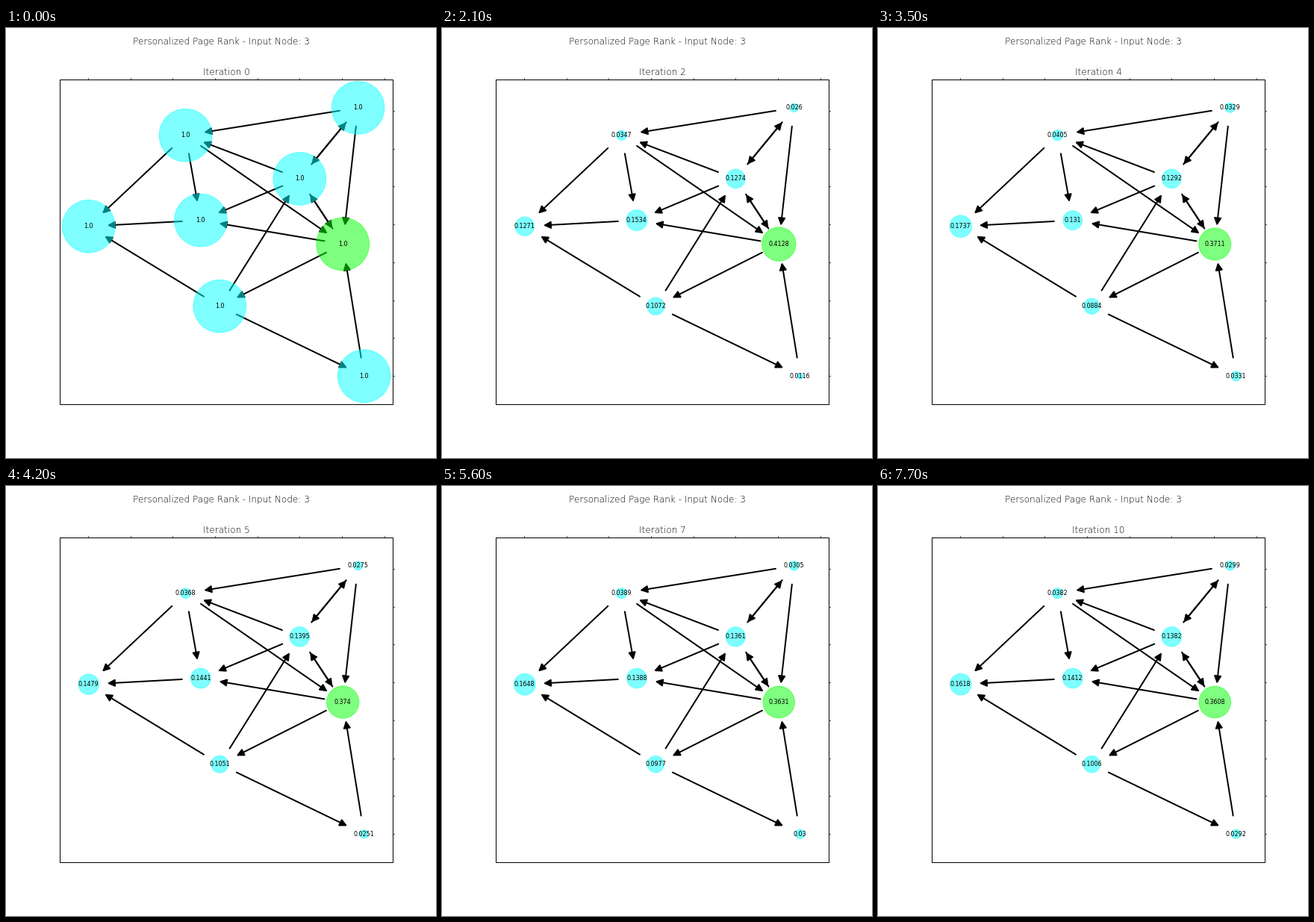
A matplotlib script for the animation above (8000 ms loop, 576 by 576 pixels).

```python
import numpy as np
import matplotlib.pyplot as plt
from matplotlib.animation import FuncAnimation
from matplotlib.patches import FancyArrowPatch

plt.rcParams["font.family"] = "DejaVu Sans"

SIZE, DPI = 576, 72
INTERVAL, FRAMES = 100, 80
DAMPING = 0.85
INPUT = "D"
LEFT, TOP, RIGHT, BOTTOM = 72, 69.12, 518.4, 504

# Node centres in pixels, y downwards
NODES = {
    "A": (240.5, 143.7), "B": (471.6, 106.86), "C": (393.3, 201.9),
    "D": (451.2, 289.5), "E": (260.8, 257.6), "F": (110.74, 265.7),
    "G": (286.3, 372.7), "H": (479.66, 466.26),
}
LINKS = {
    "A": "DEF", "B": "ACD", "C": "ABDE", "D": "CEG",
    "E": "F", "F": "", "G": "CFH", "H": "D",
}
NAMES = list(NODES)


def page_ranks(steps):
    """Rank vectors per iteration; a dead end jumps back to the input node."""
    ranks = [np.ones(len(NAMES))]
    for _ in range(steps):
        new = np.zeros(len(NAMES))
        for name, rank in zip(NAMES, ranks[-1]):
            targets = LINKS[name] or INPUT
            for target in targets:
                new[NAMES.index(target)] += DAMPING * rank / len(targets)
        new[NAMES.index(INPUT)] += 1 - DAMPING
        ranks.append(new / new.sum())
    return ranks


RANKS = page_ranks(10)

fig = plt.figure(figsize=(SIZE / DPI, SIZE / DPI), dpi=DPI, facecolor="white")
ax = fig.add_axes([0, 0, 1, 1])
ax.set_xlim(0, SIZE)
ax.set_ylim(SIZE, 0)
ax.axis("off")


def line(xs, ys, color="black"):
    ax.plot(xs, ys, color=color, lw=1, zorder=3, solid_capstyle="projecting")


def draw_frame():
    line([LEFT, RIGHT, RIGHT, LEFT, LEFT], [TOP, TOP, BOTTOM, BOTTOM, TOP])
    for x in np.linspace(110, 506.6, 8):
        line([x, x], [TOP - 2, TOP - 1], "#555555")
    for y in np.linspace(111, 466, 8):
        line([RIGHT + 1, RIGHT + 2], [y, y], "#555555")


def draw_links():
    for source, targets in LINKS.items():
        for target in targets:
            ax.add_patch(FancyArrowPatch(
                NODES[source], NODES[target], arrowstyle="-|>",
                mutation_scale=20, shrinkA=25, shrinkB=25, lw=2,
                color="black", zorder=1))


draw_frame()
draw_links()
colors = ["lime" if name == INPUT else "cyan" for name in NAMES]
dots = ax.scatter(*zip(*NODES.values()), s=5000, c=colors, alpha=0.5,
                  linewidths=1, edgecolors=colors, zorder=2)
labels = [ax.text(x, y, "", size=8, ha="center", va="center", zorder=4)
          for x, y in NODES.values()]
heading = dict(size=12, weight="ultralight", ha="center")
title = ax.text((LEFT + RIGHT) / 2, TOP - 6, "", va="baseline", **heading)
fig.text(0.5, 0.98, "Personalized Page Rank - Input Node: 3", va="top",
         **heading)


def update(frame):
    step = max(0, frame // 7 - 1)
    title.set_text(f"Iteration {step}")
    dots.set_sizes(5000 * RANKS[step])
    for label, rank in zip(labels, RANKS[step]):
        label.set_text(str(round(float(rank), 4)))
    return [dots, title, *labels]


animation = FuncAnimation(fig, update, frames=FRAMES, interval=INTERVAL,
                          repeat=True, repeat_delay=0, blit=False)
plt.show()
```
